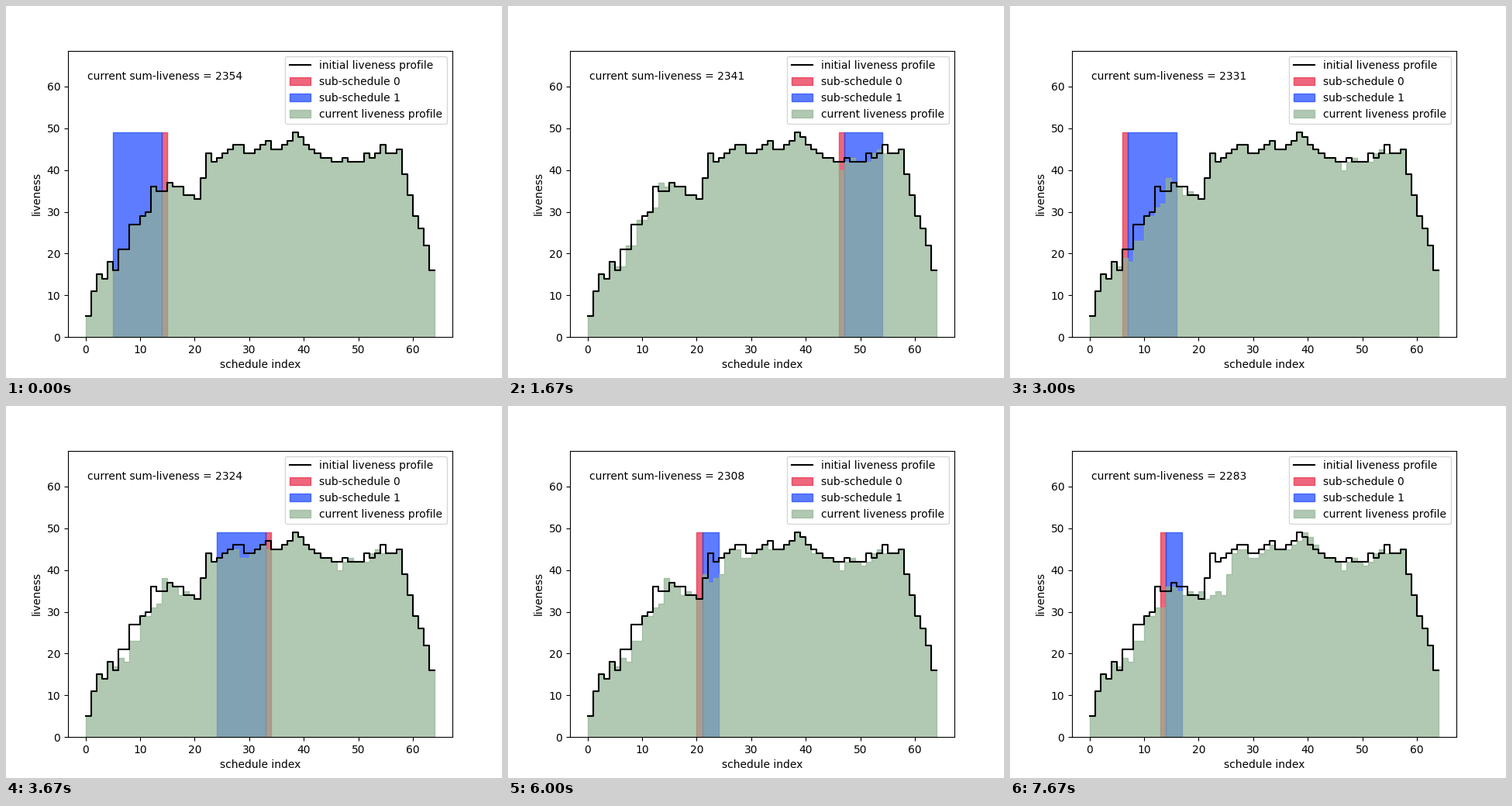
These frames come from a looping animation (640 px wide and 480 px high, 8 s). A matplotlib script:

```python
import matplotlib.pyplot as plt
import numpy as np
from matplotlib.animation import FuncAnimation

RED, BLUE, GREEN = "#e72744", "#1845ff", "#91b392"
ALPHA = 0.7
LOOP_MS = 8000

INITIAL = np.array([
    5, 11, 15, 14, 18, 16, 21, 21, 27, 27, 29, 30, 36, 35, 35, 37,
    36, 36, 34, 34, 33, 38, 44, 42, 43, 44, 45, 46, 46, 44, 44, 45,
    46, 47, 45, 45, 46, 47, 49, 48, 46, 45, 44, 43, 43, 42, 42, 43,
    42, 42, 42, 44, 43, 44, 46, 44, 44, 45, 39, 34, 29, 26, 22, 16])

# (start, end, moves to the front?, liveness shift of the passed block,
#  liveness at the moved instruction)
MOVES = [
    (5, 15, True, 1, 17),
    (52, 55, True, 0, 45),
    (46, 54, True, 0, 40),
    (17, 19, True, -1, 34),
    (6, 16, True, 1, 19),
    (24, 34, False, -1, 45),
    (21, 26, False, -5, 44),
    (41, 44, True, -1, 44),
    (50, 52, True, 0, 41),
    (20, 24, False, -4, 34),
    (23, 43, True, 0, 35),
    (13, 17, True, (4, -2, -2), 31),
]


def apply_move(profile, move):
    start, end, to_front, shift, moved = move
    result = profile.copy()
    if to_front:
        result[start] = moved
        result[start + 1:end] = profile[start:end - 1] + np.array(shift)
    else:
        result[start:end - 1] = profile[start + 1:end] + np.array(shift)
        result[end - 1] = moved
    return result


profiles = [INITIAL]
for move in MOVES:
    profiles.append(apply_move(profiles[-1], move))

steps = np.arange(len(INITIAL) + 1)
peak = INITIAL.max()

fig, ax = plt.subplots(figsize=(6.4, 4.8), dpi=100)


def closed(profile):
    """Repeat the last value so the final step has its full width."""
    return np.append(profile, profile[-1])


def band(left, right, color, label):
    ax.fill_between([left, right], 0, peak, color=color, alpha=ALPHA, label=label)


def draw(frame):
    # Each move takes two frames: before and after the swap.
    index, swapped = divmod(frame, 2)
    start, end, to_front = MOVES[index][:3]
    profile = profiles[index + swapped]
    red_first = to_front == bool(swapped)

    ax.clear()
    ax.plot(steps, closed(INITIAL), color="black", drawstyle="steps-post",
            label="initial liveness profile")
    if red_first:
        red, blue = (start, start + 1), (start + 1, end)
    else:
        red, blue = (end - 1, end), (start, end - 1)
    band(*red, RED, "sub-schedule 0")
    band(*blue, BLUE, "sub-schedule 1")
    ax.fill_between(steps, closed(profile), step="post", color=GREEN,
                    alpha=ALPHA, label="current liveness profile")
    ax.text(0.05, 0.9, f"current sum-liveness = {profile.sum()}",
            transform=ax.transAxes)
    ax.set(xlim=(-3.2, 67.2), ylim=(0, 1.4 * peak),
           xlabel="schedule index", ylabel="liveness")
    ax.legend(loc="upper right")


frame_count = 2 * len(MOVES)
animation = FuncAnimation(fig, draw, frames=frame_count,
                          interval=LOOP_MS / frame_count,
                          init_func=lambda: None, repeat=True, repeat_delay=0)
plt.show()
```
